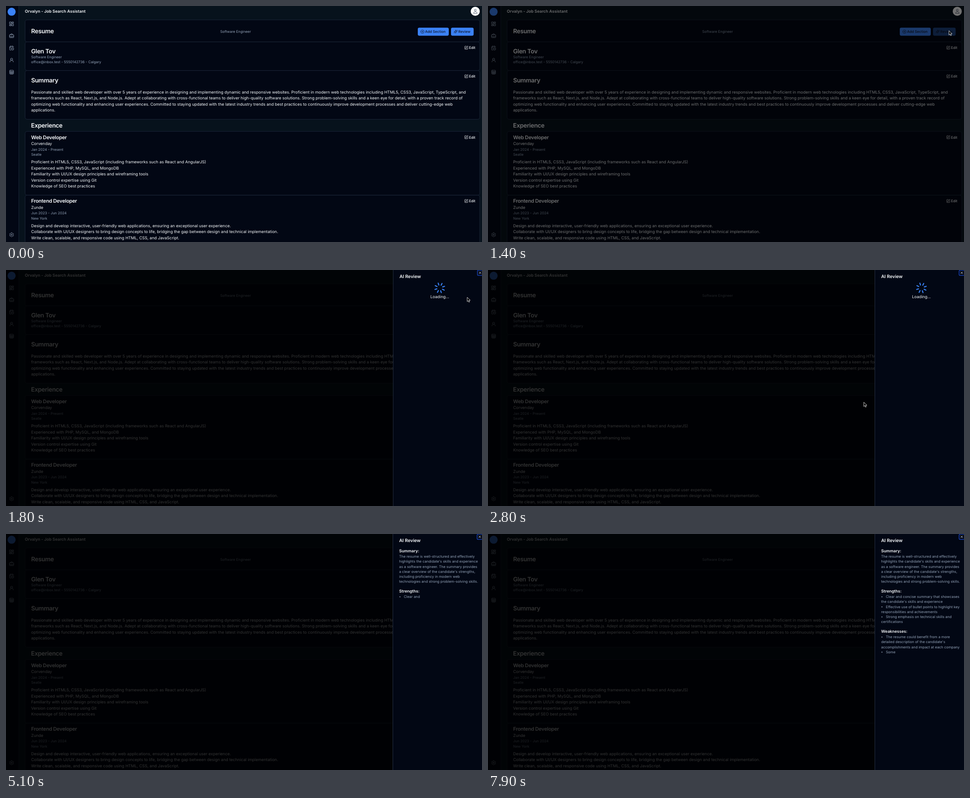
Recreate the animation shown at these times as an HTML page. Size 1060x528 px, loop 8000 ms.

```html
<!DOCTYPE html>
<html lang="en">
<head>
<meta charset="utf-8">
<title>Resume review</title>
<style>
  html, body { margin: 0; width: 100%; height: 100%; overflow: hidden; background: #020817; }
  svg { display: block; width: 1060px; height: 528px; }
  text { font-family: Inter, "Open Sans", sans-serif; text-rendering: geometricPrecision; white-space: pre; }
  .icon { fill: none; stroke-width: 2; stroke-linecap: round; stroke-linejoin: round; }
</style>
</head>
<body>
<svg id="stage" viewBox="0 0 1060 528" xmlns="http://www.w3.org/2000/svg"></svg>
<script>
const LOOP = 8000, STEP = 100;
const WHITE = '#f8fafc', MUTED = '#94a3b8', LINE = '#1e293b', CARD = '#020714',
      MAIN = '#07121c', BLUE = '#3b82f6', INK = '#0f172a';

// Text is placed by the middle of its capitals.
const label = (x, y, str, size = 8.99, color = WHITE, weight = 400, extra = '') =>
  `<text x="${x}" y="${y + size * 0.364}" font-size="${size}" fill="${color}" font-weight="${weight}" ${extra}>${str}</text>`;
const small = (x, y, str) => label(x, y, str, 7.875, MUTED);
const title = (x, y, str, size = 13.5) =>
  label(x, y, str, size, WHITE, 600, 'letter-spacing="-.025em"');
const box = (x, y, w, h, r, fill, extra = '') =>
  `<rect x="${x}" y="${y}" width="${w}" height="${h}" rx="${r}" fill="${fill}" ${extra}/>`;
const card = (y, bottom) =>
  box(42.5, y, 1012.5, bottom - y, 4.5, CARD, `stroke="${LINE}" stroke-width=".9"`);

// A small wavy ring with six bumps.
const gear = Array.from({ length: 73 }, (_, i) => {
  const a = i * Math.PI / 36, r = 8.9 + 1.2 * Math.cos(6 * a);
  return `${i ? 'L' : 'M'}${(12 + r * Math.sin(a)).toFixed(2)} ${(12 - r * Math.cos(a)).toFixed(2)}`;
}).join('');

const ring = (x, y, r) => `M${x - r} ${y}a${r} ${r} 0 1 0 ${2 * r} 0a${r} ${r} 0 1 0 ${-2 * r} 0`;
const ICONS = {
  board: 'M3 3h7v9H3zM14 3h7v5h-7zM14 12h7v9h-7zM3 16h7v5H3z',
  bag: 'M4 6h16a2 2 0 0 1 2 2v10a2 2 0 0 1-2 2H4a2 2 0 0 1-2-2V8a2 2 0 0 1 2-2zM16 6V4a2 2 0 0 0-2-2h-4a2 2 0 0 0-2 2v2M22 13a18 18 0 0 1-20 0M12 12h.01',
  calendar: 'M21 7.5V6a2 2 0 0 0-2-2H5a2 2 0 0 0-2 2v14a2 2 0 0 0 2 2h3.5M16 2v4M8 2v4M3 10h5M17.5 17.5 16 16.3V14' + ring(16, 16, 6),
  user: ring(12, 8, 5) + 'M20 21a8 8 0 0 0-16 0',
  avatar: ring(12, 7, 4.5) + 'M3.5 21.5c0-10 17-10 17 0z',
  sheet: 'M5 3h14a2 2 0 0 1 2 2v14a2 2 0 0 1-2 2H5a2 2 0 0 1-2-2V5a2 2 0 0 1 2-2zM3 9h18M3 15h18M9 9v12M15 9v12',
  gear: gear + ring(12, 12, 3),
  edit: 'M12 3H5a2 2 0 0 0-2 2v14a2 2 0 0 0 2 2h14a2 2 0 0 0 2-2v-7M18.4 2.6a2.1 2.1 0 0 1 3 3L12 15l-4 1 1-4z',
  plus: ring(12, 12, 10) + 'M8 12h8M12 8v8',
  spark: 'M12 2.5 14 10 21.5 12 14 14 12 21.5 10 14 2.5 12 10 10zM20 3v4M22 5h-4M4 17v2M5 18H3'
};
const icon = (name, x, y, size, color) =>
  `<path class="icon" d="${ICONS[name]}" stroke="${color}" transform="translate(${x - size / 2} ${y - size / 2}) scale(${size / 24})"/>`;
const edit = y => icon('edit', 1025, y, 9, WHITE) + label(1031, y + .3, 'Edit', 7.875, WHITE, 500);

const lines = (y, rows) => rows.map((row, i) => label(56, y + 13.5 * i, row)).join('');
const job = (y, bottom, role, firm, dates, place, rows) =>
  card(y, bottom) + title(56, y + 13, role, 11.25) + label(56, y + 27.6, firm) +
  small(56, y + 40.2, dates) + small(56, y + 51.4, place) + lines(y + 68.3, rows) + edit(y + 13);

const sidebar = box(0, 0, 28.5, 528, 0, CARD) +
  `<path d="M28.5 0V528" stroke="${LINE}" stroke-width=".9"/>` +
  `<circle cx="12.5" cy="12.8" r="9" fill="${BLUE}"/>` +
  ['board', 'bag', 'calendar', 'user', 'sheet']
    .map((name, i) => icon(name, 12.5, 40 + 27 * i, 11.25, MUTED)).join('') +
  icon('gear', 12.5, 511.8, 11.25, MUTED);

const page = box(0, 0, 1060, 528, 0, MAIN) + sidebar +
  label(42, 12, 'Orvalyn - Job Search Assistant', 9, WHITE, 600) +
  `<circle cx="1045" cy="11.9" r="10.1" fill="#fff"/>` + icon('avatar', 1045.2, 11.6, 11.25, '#475569') +
  card(31, 80.3) + title(56, 56, 'Resume') + small(477, 57.4, 'Software Engineer') +
  box(917, 48.4, 69, 18, 3.4, BLUE) + icon('plus', 927.4, 57.4, 9, INK) +
  label(933.2, 57.5, 'Add Section', 7.875, INK, 500) +
  `<g id="review">${box(991, 48.4, 50.4, 18, 3.4, BLUE, 'id="reviewFill"')}` +
  icon('spark', 1001.3, 57.4, 9, INK) + label(1007.3, 57.5, 'Review', 7.875, INK, 500) + '</g>' +
  card(80.3, 144.4) + title(56, 101.5, 'Glen Tov') + small(56, 113.7, 'Software Engineer') +
  small(56, 125, 'office@inbox.test - 5550142736 - Calgary') + edit(93.3) +
  card(144.4, 253.4) + title(56, 165.6, 'Summary') + edit(157.3) +
  lines(192.3, [
    'Passionate and skilled web developer with over 5 years of experience in designing and implementing dynamic and responsive websites. Proficient in modern web technologies including HTML5, CSS3, JavaScript, TypeScript, and',
    'frameworks such as React, Next.js, and Node.js. Adept at collaborating with cross-functional teams to deliver high-quality software solutions. Strong problem-solving skills and a keen eye for detail, with a proven track record of',
    'optimizing web functionality and enhancing user experiences. Committed to staying updated with the latest industry trends and best practices to continuously improve development processes and deliver cutting-edge web',
    'applications.'
  ]) +
  title(55.8, 267.2, 'Experience') +
  job(280.6, 423.2, 'Web Developer', 'Corvenday', 'Jan 2024 - Present', 'Seatle', [
    'Proficient in HTML5, CSS3, JavaScript (including frameworks such as React and AngularJS)',
    'Experienced with PHP, MySQL, and MongoDB',
    'Familiarity with UI/UX design principles and wireframing tools',
    'Version control expertise using Git',
    'Knowledge of SEO best practices'
  ]) +
  job(423.3, 560, 'Frontend Developer', 'Zunde', 'Jun 2023 - Jun 2024', 'New York', [
    'Design and develop interactive, user-friendly web applications, ensuring an exceptional user experience.',
    'Collaborate with UI/UX designers to bring design concepts to life, bridging the gap between design and technical implementation.',
    'Write clean, scalable, and responsive code using HTML, CSS, and JavaScript.'
  ]);

// Each block is a heading and up to six lines; "*" starts a bullet.
const REVIEW = [
  ['Summary:', 'The resume is well-structured and effectively', "highlights the candidate's skills and experience",
    'as a software engineer. The summary provides', "a clear overview of the candidate's strengths,",
    'including proficiency in modern web', 'technologies and strong problem-solving skills.'],
  ['Strengths:', '*Clear and concise summary that showcases', "the candidate's skills and experience",
    '*Effective use of bullet points to highlight key', 'responsibilities and achievements',
    '*Strong emphasis on technical skills and', 'certifications'],
  ['Weaknesses:', '*The resume could benefit from a more', "detailed description of the candidate's",
    'accomplishments and impact at each company', '*Some']
];
const rows = [];
let reviewText = '';
REVIEW.forEach((block, b) => block.forEach((str, i) => {
  const bullet = str[0] === '*', y = 90 * b + (i ? 38.9 + 11.25 * i : 37.9);
  rows.push((bullet ? str.slice(1) : str).split(' '));
  reviewText += '<g class="row">' + (bullet ? `<circle cx="15.8" cy="${y + .4}" r="1.15" fill="${MUTED}"/>` : '') +
    (i ? small(bullet ? 24.5 : 14, y, '') : label(14, y, '', 9, WHITE, 600)) + '</g>';
}));

const spokes = Array.from({ length: 8 }, (_, i) => `<path d="M0-6.75V-11.25" transform="rotate(${45 * i})"/>`).join('');
const panel = box(0, -2, 216, 532, 0, CARD, `stroke="#293548" stroke-width=".9"`) +
  label(14, 14.2, 'AI Review', 10.125, WHITE, 600) +
  box(187.6, .5, 12, 11.6, 2.2, 'none', 'stroke="#1d4ed8" stroke-width="1.2"') +
  `<path d="M191.2 4l4.6 4.6m0-4.6l-4.6 4.6" stroke="#c3c8d0" stroke-width="1" stroke-linecap="round"/>` +
  `<g id="loading"><g transform="translate(103.7 40)"><g id="spinner" stroke="${BLUE}" stroke-width="2.25" stroke-linecap="round">${spokes}</g></g>` +
  label(103.7, 60.2, 'Loading...', 9, WHITE, 400, 'text-anchor="middle"') + '</g>' + reviewText;

const pointer = '<path id="arrow" d="M0 0V9.6L2.3 7.5 3.8 11 5.4 10.3 3.9 6.9H7z" fill="#000" stroke="#fff" stroke-width=".8"/>' +
  '<path id="hand" transform="translate(-3 -.5)" d="M2.2 6.5V1.3a.8.8 0 0 1 1.6 0V4.3a.75.75 0 0 1 1.4.2a.75.75 0 0 1 1.4.3a.7.7 0 0 1 1.3.4V8q0 2-1.5 3H3Q2 9 .3 7.2a.7.7 0 0 1 1-1z" fill="#fff" stroke="#000" stroke-width=".6"/>';

const stage = document.getElementById('stage');
stage.innerHTML = page + box(0, 0, 1060, 528, 0, '#000', 'id="shade"') +
  `<g id="panel">${panel}</g><g id="pointer">${pointer}</g>`;
const el = id => document.getElementById(id);
const rowEls = [...stage.querySelectorAll('.row')];
const show = (node, on) => node.setAttribute('visibility', on ? 'visible' : 'hidden');
const move = (node, x, y) => node.setAttribute('transform', `translate(${x} ${y})`);

// Tables of [time, value...], read with straight lines between the steps.
const SHADE = [[1300, 0], [1400, .56], [1500, .8]];
const PANEL = [[1400, 1064], [1500, 880], [1600, 865], [1700, 863], [1800, 862.2], [1900, 861.5]];
const WORDS = [[3000, 0], [3100, 1], [3300, 5], [4000, 21], [6100, 58], [6600, 67], [6900, 67], [7000, 68], [7800, 86], [7900, 87]];
const PATH = [[400, 968, 121], [500, 1042.5, 61], [700, 1042.5, 61], [800, 1034, 60], [1300, 1029, 57],
  [1400, 1026.5, 55.3], [1500, 1027, 61], [1800, 1027, 61], [2400, 960, 150], [3300, 683, 478],
  [3600, 650, 511], [4000, 633.8, 461.3], [4200, 634.5, 481], [4500, 625, 494]];

function at(table, t) {
  const i = table.findIndex(step => step[0] > t);
  if (i === 0) return table[0].slice(1);
  if (i < 0) return table[table.length - 1].slice(1);
  const a = table[i - 1], b = table[i], k = (t - a[0]) / (b[0] - a[0]);
  return a.slice(1).map((v, j) => v + (b[j + 1] - v) * k);
}

function draw(now) {
  const t = Math.floor(now % LOOP / STEP) * STEP;
  const hover = t >= 800 && t < 1400;

  el('shade').setAttribute('opacity', at(SHADE, t)[0]);
  el('reviewFill').setAttribute('fill', hover ? '#3576e0' : BLUE);
  el('review').setAttribute('opacity', t >= 1400 ? .5 : 1);
  move(el('panel'), at(PANEL, t)[0], 0);
  show(el('panel'), t >= 1500);

  show(el('pointer'), t >= 400 && t < 4900);
  move(el('pointer'), ...at(PATH, t));
  el('arrow').style.display = hover ? 'none' : '';
  el('hand').style.display = hover ? '' : 'none';

  el('loading').style.display = t < 3100 ? '' : 'none';
  el('spinner').setAttribute('transform', `rotate(${(t - 1350) * .36})`);

  let left = Math.floor(at(WORDS, t)[0] + 1e-6);
  rows.forEach((words, i) => {
    const n = Math.max(0, Math.min(left, words.length));
    rowEls[i].style.display = n ? '' : 'none';
    rowEls[i].querySelector('text').textContent = words.slice(0, n).join(' ');
    left -= words.length;
  });
}

function tick(now) {
  draw(now);
  requestAnimationFrame(tick);
}
draw(0);
requestAnimationFrame(tick);
</script>
</body>
</html>
```
